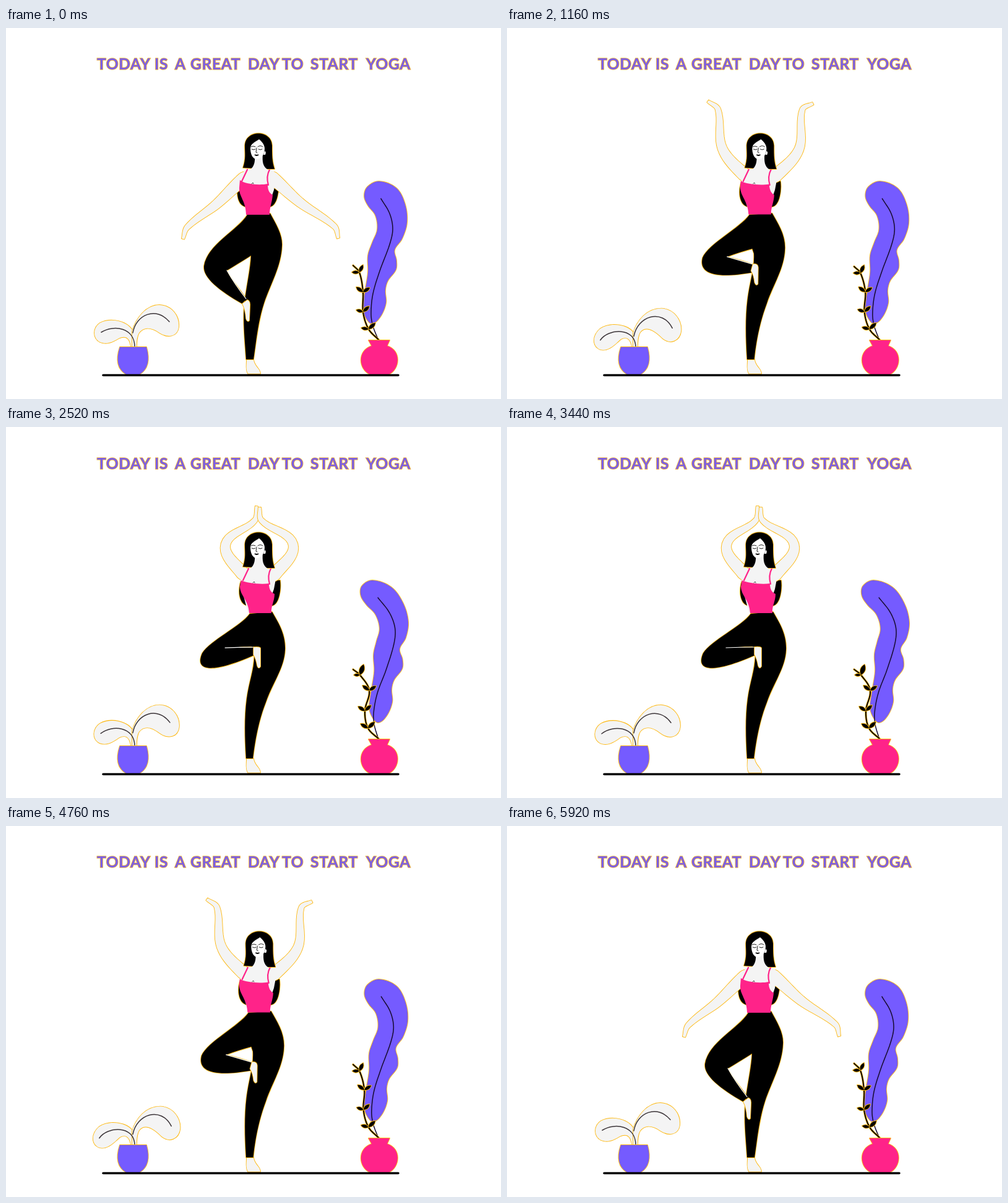
An HTML page for the animation above (5960 ms loop, 800 by 600 pixels).

```html
<!DOCTYPE html>
<html lang="en">
<head>
<meta charset="utf-8">
<title>Yoga day</title>
<style>
  html, body { margin: 0; width: 100%; height: 100%; overflow: hidden; background: #fff; }
  svg { display: block; width: 100vw; height: 100vh; }
  text { font: 700 24.5px Lato, "Open Sans", sans-serif; letter-spacing: .7px; fill: #7a5fe6;
         stroke: #f5b335; stroke-width: 1.7px; paint-order: stroke; }
</style>
</head>
<body>
<svg id="stage" viewBox="0 0 800 600"></svg>
<script>
(() => {
const LOOP = 5960, STEP = 40, TURN = 2960;
const TIMES = [0, 680, 1680, 2480, TURN];
const GOLD = '#fdb913', LIGHT = '#f4f4f4', PURPLE = '#755bff', PINK = '#ff2389', INK = '#000';
const stage = document.getElementById('stage');

function add(tag, attrs, parent = stage) {
  const el = document.createElementNS('http://www.w3.org/2000/svg', tag);
  for (const key in attrs) el.setAttribute(key, attrs[key]);
  return parent.appendChild(el);
}
const solid = (fill, d = '', parent) =>
  add('path', { d, fill, stroke: GOLD, 'stroke-width': 1.8, 'stroke-linejoin': 'round', 'paint-order': 'stroke' }, parent);
const plain = (fill, d = '', parent) => add('path', { d, fill }, parent);
const line = (stroke, width, d = '', parent) =>
  add('path', { d, fill: 'none', stroke, 'stroke-width': width, 'stroke-linecap': 'round', 'stroke-linejoin': 'round' }, parent);
const group = () => add('g', {});

// Monotone cubic through the key values, resting at both ends.
function track(values, time) {
  const v = values.length < 5 ? [...values, values[3] + .3 * (values[3] - values[2])] : values;
  let i = 0;
  while (i < 3 && time > TIMES[i + 1]) i++;
  const rate = k => (v[k + 1] - v[k]) / (TIMES[k + 1] - TIMES[k]);
  const slope = k => {
    if (k === 0 || k === 4) return 0;
    const a = rate(k - 1), b = rate(k);
    return a * b > 0 ? 2 * a * b / (a + b) : 0;
  };
  const span = TIMES[i + 1] - TIMES[i], u = (time - TIMES[i]) / span;
  const s = u * u * (3 - 2 * u);
  return v[i] + (v[i + 1] - v[i]) * s
    + span * (slope(i) * u * (1 - u) ** 2 - slope(i + 1) * u * u * (1 - u));
}

const NUMBER = /-?\d+(?:\.\d+)?/g;
const numbers = d => d.match(NUMBER).map(Number);
const refill = (d, value) => { let i = 0; return d.replace(NUMBER, () => value(i++).toFixed(2)); };

function posed(paths) {
  const keys = paths.map(numbers);
  return time => refill(paths[0], i => track(keys.map(k => k[i]), time));
}
function blend(a, b) {
  const from = numbers(a), to = numbers(b);
  return k => refill(a, i => from[i] + (to[i] - from[i]) * k);
}

// Smooth curve through points; extra coordinates are interpolated linearly.
function spline(points, closed = false, steps = 8) {
  const n = points.length, out = [];
  const at = i => closed ? points[(i + n) % n] : points[Math.max(0, Math.min(n - 1, i))];
  const heading = i => {
    const [ax, ay] = at(i - 1), [bx, by] = at(i + 1), len = Math.hypot(bx - ax, by - ay) || 1;
    return [(bx - ax) / len, (by - ay) / len];
  };
  for (let i = 0; i < (closed ? n : n - 1); i++) {
    const p = at(i), q = at(i + 1), hp = heading(i), hq = heading(i + 1);
    const len = Math.hypot(q[0] - p[0], q[1] - p[1]);
    for (let j = 0; j < steps; j++) {
      const u = j / steps, s = u * u * (3 - 2 * u);
      const a = len * u * (1 - u) ** 2, b = len * u * u * (1 - u);
      out.push(p.map((c, k) => k < 2 ? c + (q[k] - c) * s + hp[k] * a - hq[k] * b : c + (q[k] - c) * u));
    }
  }
  if (!closed) out.push(points[n - 1]);
  return out;
}
const trace = points => 'M' + points.map(p => p[0].toFixed(2) + ' ' + p[1].toFixed(2)).join('L');

// Arms: shoulder, elbow, wrist and fingertip in each key pose.
function makeArm(collar, poses) {
  const bones = poses.map(p => [0, 1, 2].map(i => {
    const dx = p[i + 1][0] - p[i][0], dy = p[i + 1][1] - p[i][1];
    return { angle: Math.atan2(dy, dx), length: Math.hypot(dx, dy) };
  }));
  for (let k = 1; k < bones.length; k++) bones[k].forEach((bone, i) => {
    const turn = bone.angle - bones[k - 1][i].angle;
    bone.angle -= 2 * Math.PI * Math.round(turn / (2 * Math.PI));
  });
  const widths = [10.5, 7.5, 4.3, 2.2];
  return time => {
    let x = track(poses.map(p => p[0][0]), time), y = track(poses.map(p => p[0][1]), time);
    const chain = [[...collar, 9], [x, y, widths[0]]];
    for (let i = 0; i < 3; i++) {
      const angle = track(bones.map(b => b[i].angle), time), length = track(bones.map(b => b[i].length), time);
      x += Math.cos(angle) * length;
      y += Math.sin(angle) * length;
      chain.push([x, y, widths[i + 1]]);
    }
    const mid = spline(chain, false, 10);
    const side = sign => mid.map((p, i) => {
      const a = mid[Math.max(0, i - 1)], b = mid[Math.min(mid.length - 1, i + 1)];
      const dx = b[0] - a[0], dy = b[1] - a[1], len = Math.hypot(dx, dy) || 1;
      return [p[0] - sign * dy / len * p[2], p[1] + sign * dx / len * p[2]];
    });
    return trace([...side(1), ...side(-1).reverse()]) + 'Z';
  };
}
const leftArm = makeArm([397, 240], [
  [[384, 244], [340, 285], [293, 322], [286, 341]],
  [[383, 238], [332, 212], [268, 197], [253, 206]],
  [[383, 236], [358, 189], [403, 149], [406, 124]],
  [[382, 236], [355, 190], [402, 151], [405, 128]]
]);
const rightArm = makeArm([423, 240], [
  [[431, 243], [475, 282], [531, 321], [537, 340]],
  [[434, 240], [485, 212], [547, 194], [561, 205]],
  [[434, 238], [464, 190], [416, 149], [415, 126]],
  [[434, 238], [464, 190], [413, 151], [410, 130]]
]);

const standingLeg = posed([
  'M390 302L427 300C437 318 447 335 446 352C445 385 427 415 417 445C407 475 404 510 400 536H388C386 505 382 470 386 440C390 410 395 390 396 368L385 330Z',
  'M390 302L427 300C437 318 448 335 447 354C446 388 430 415 420 445C409 475 402 510 400 536H388C386 505 385 470 388 440C391 410 398 390 398 364L385 330Z',
  'M394 302L430 299C440 316 452 335 451 360C450 390 430 415 420 445C408 475 402 510 399 536H388C386 505 385 470 389 440C393 410 402 390 400 366L390 330Z',
  'M394 302L430 299C440 316 452 335 451 360C450 390 430 415 420 445C408 475 402 510 399 536H388C386 505 385 470 389 440C393 410 402 390 401 368L390 330Z'
]);
const bentLeg = posed([
  'M390 302C375 327 325 350 320 385C318 404 345 425 382 446L388 438C378 422 364 408 357 392C367 386 380 378 396 368L420 340Z',
  'M390 302C375 325 322 352 316 380C315 402 345 416 390 430L396 420C382 408 370 398 359 387C370 380 385 372 398 365L420 340Z',
  'M394 302C380 322 330 345 316 365C305 394 330 398 400 366L398 350C385 351 370 352 352 354C370 351 385 350 398 349L420 340Z',
  'M394 302C380 322 330 345 317 366C305 394 330 400 401 369L400 356C387 356 372 356 354 357C372 356 387 355 400 355L420 340Z'
]);
const shinEdge = posed(['M357 392Q370 415 388 438', 'M359 387Q377 404 396 420', 'M352 354Q375 351 399 350', 'M354 357Q377 356 401 356']);
const raisedFoot = posed([
  'M382 446L390 440Q395 441 394 452L393 473Q390 476 388 470Q387 455 382 446Z',
  'M390 429L397 420Q403 420 403 430L402 453Q400 456 397 450Q395 436 390 429Z',
  'M398 362L398 350Q408 349 408 352L408 381Q405 386 403 380Q402 368 398 362Z',
  'M400 368L400 356Q411 355 411 358L411 387Q408 392 406 386Q404 374 400 368Z'
]);
const camisole = posed([
  'M378 246C385 252 408 255 423 252C423 260 424 266 431 270C430 282 426 290 426 302H388C388 280 376 272 377 258Z',
  'M375 248C385 253 408 255 423 252C423 260 425 266 430 270C429 282 425 290 425 302H388C388 280 376 272 375 256Z',
  'M381 247C388 252 410 255 425 253C425 261 427 267 434 270C434 282 428 290 429 301H393C392 280 378 272 379 258Z',
  'M380 248C388 252 410 255 425 253C425 261 427 267 434 270C434 282 428 290 429 301H393C392 280 378 272 378 258Z'
]);

// Pale plant: raised and drooping poses.
const leftFrond = blend(
  'M202 516C200 500 193 497 182 502C171 509 162 512 152 508C139 501 141 484 152 477C170 468 198 474 206 492L211 516Z',
  'M202 516C200 503 193 498 184 504C172 516 163 526 150 523C136 517 138 500 150 489C168 476 198 482 206 496L211 516Z');
const rightFrond = blend(
  'M204 490C210 470 226 448 248 448C268 449 281 466 279 484C277 499 262 502 248 493C235 484 223 483 215 493C211 500 211 508 211 516L204 516Z',
  'M204 494C210 474 226 455 250 455C270 456 283 474 282 491C280 508 264 516 251 503C237 488 224 481 215 492C211 499 211 508 211 516L204 516Z');
const leftVein = blend('M154 492C175 479 208 485 208 516', 'M150 508C160 488 207 482 208 516');
const rightVein = blend('M205 493C210 463 243 450 264 475', 'M205 500C211 467 252 453 268 488');

// Tall leaf: outline and vein, bent by height.
const LEAF = [[603, 248], [584, 257], [579, 272], [585, 287], [597, 303], [600, 326], [592, 347], [585, 368], [585, 395],
  [580, 428], [577, 455], [583, 471], [592, 478], [605, 467], [614, 445], [613, 424], [617, 409], [630, 391],
  [631, 376], [628, 359], [640, 341], [648, 315], [645, 285], [631, 259]];
const VEIN = [[606, 276], [620, 300], [625, 325], [620, 350], [604, 393], [593, 430], [590, 462], [593, 482], [602, 505]];
const bend = y => 10 - 19 * (Math.max(0, 385 - y) / 130) ** 1.4;
const rootFade = y => Math.min(1, (505 - y) / 105);

const title = group();
[['TODAY', 147], ['IS', 240], ['A', 273], ['GREAT', 298], ['DAY', 391], ['TO', 446], ['START', 492], ['YOGA', 582]]
  .forEach(([word, x]) => { add('text', { x, y: 67 }, title).textContent = word; });

const leaf = solid(PURPLE);
const leafVein = line('#160b2e', 1.5);
const twigGlow = line(GOLD, 3.4), twig = line(INK, 1.9), twigLeaves = solid(INK);
solid(PINK, 'M586 505H620L616 514C640 522 636 552 619 560H588C570 552 567 522 591 514Z');

const fronds = [solid(LIGHT), solid(LIGHT)];
const frondVeins = [line('#3b3438', 1.5), line('#3b3438', 1.5)];
solid(PURPLE, 'M184 516H227C232 534 231 551 216 560H194C179 551 178 534 184 516Z');

const backHair = solid(INK, 'M377 248C372 262 372 284 386 289H427C438 287 442 264 440 248Z');
const arms = [solid(LIGHT), solid(LIGHT)];
plain(LIGHT, 'M385 230C395 229 402 226 402 212H415C415 224 425 229 433 231L437 241L433 262L420 300H391L381 262L379 246Z');
solid(LIGHT, 'M389 536H400C401 547 411 551 411 559H391C387 552 389 545 389 536Z');
const trousersEdge = line(GOLD, 1.8), standing = plain(INK), bent = plain(INK), shin = line('#fff', 1.2);
const sole = solid(LIGHT);
const vest = plain(PINK);
const straps = line(PINK, 2.2, 'M390 229L381 248M426 229Q420 240 424 254');
const crease = line('#333', .9, 'M397 252L399 250L400 252');

const head = group();
solid(INK, 'M383 226C388 211 386 202 386 190C387 164 429 164 430 190C430 206 430 216 434 228H417L410 200L401 227Z', head);
plain(LIGHT, 'M402 206C403 219 400 224 395 229H423C415 224 414 216 415 204Z', head);
plain('#fff', 'M409 180C402 185 395 187 395 195C395 206 400 212 405 212C412 212 418 205 418 195C418 189 414 184 409 180Z', head);
plain('#fff', 'M418 199Q421 200 419 205L416 205Z', head);
line('#222', 1, 'M396 192Q399 190 403 192M407 192Q411 189 415 192M397 196Q400 198 403 196M408 196Q411 198 414 196M405 194L404 201L406 202', head);
plain(INK, 'M401 205Q403 204 405 205Q407 204 409 205Q405 209 401 205Z', head);

line(INK, 3.4, 'M157 561.5H634');

function leafPair([x, y], ...tips) {
  const f = n => n.toFixed(2);
  return tips.map(([dx, dy]) => {
    const nx = -dy * .42, ny = dx * .42, mx = x + dx * .5, my = y + dy * .5;
    return `M${f(x)} ${f(y)}Q${f(mx + nx)} ${f(my + ny)} ${f(x + dx)} ${f(y + dy)}Q${f(mx - nx)} ${f(my - ny)} ${f(x)} ${f(y)}Z`;
  }).join('');
}

const setPath = (el, d) => el.setAttribute('d', d);
const shift = (el, x, y = 0) => el.setAttribute('transform', `translate(${x.toFixed(2)} ${y.toFixed(2)})`);

function drawPlants(time) {
  const sway = track([0, -.1, .5, 1, 1.15], time), drift = track([0, 1.2, .5, 0, 0], time);
  setPath(leaf, trace(spline(LEAF.map(([x, y]) => [x + drift + sway * bend(y), y]), true)) + 'Z');
  setPath(leafVein, trace(spline(VEIN.map(([x, y]) => [x + (drift + sway * bend(y)) * rootFade(y), y]))));

  const w = track([0, 0, .6, 1, 1.1], time);
  const nodes = [[571 + w, 395 + 6 * w], [577 + 10 * w, 427 - w], [577 + 3 * w, 459], [586 - w, 487]];
  const stem = trace(spline([[561, 384 + 8 * w], ...nodes, [603, 505]]));
  setPath(twigGlow, stem);
  setPath(twig, stem);
  setPath(twigLeaves, leafPair(nodes[0], [-12 + 2 * w, 0], [6, -12 - 5 * w])
    + leafPair(nodes[1], [-11, -8], [11, -7])
    + leafPair(nodes[2], [-11, -3 - 4 * w], [10, -9])
    + leafPair(nodes[3], [-12, -2 - 5 * w], [11, -10]));

  const droop = track([0, .47, 1, .25, 0], time);
  [leftFrond, rightFrond].forEach((shape, i) => setPath(fronds[i], shape(droop)));
  [leftVein, rightVein].forEach((shape, i) => setPath(frondVeins[i], shape(droop)));
}

function drawWoman(time) {
  shift(backHair, track([0, 2, 2, 3], time));
  shift(head, track([0, 1.5, 1, 0, 0], time));
  const chest = track([0, -.5, 2, 2, 2], time);
  shift(straps, chest);
  shift(crease, chest);
  setPath(arms[0], leftArm(time));
  setPath(arms[1], rightArm(time));
  const legs = [standingLeg(time), bentLeg(time)];
  setPath(trousersEdge, legs.join(''));
  setPath(standing, legs[0]);
  setPath(bent, legs[1]);
  setPath(shin, shinEdge(time));
  setPath(sole, raisedFoot(time));
  setPath(vest, camisole(time));
}

function render(now) {
  const clock = Math.floor(now % LOOP / STEP) * STEP;
  const time = Math.min(clock, 2 * TURN - clock);
  shift(title, 0, track([0, .9, -.6, .9, 1], time));
  drawPlants(time);
  drawWoman(time);
}

const start = performance.now();
function tick() {
  render(performance.now() - start);
  requestAnimationFrame(tick);
}
tick();
})();
</script>
</body>
</html>
```
